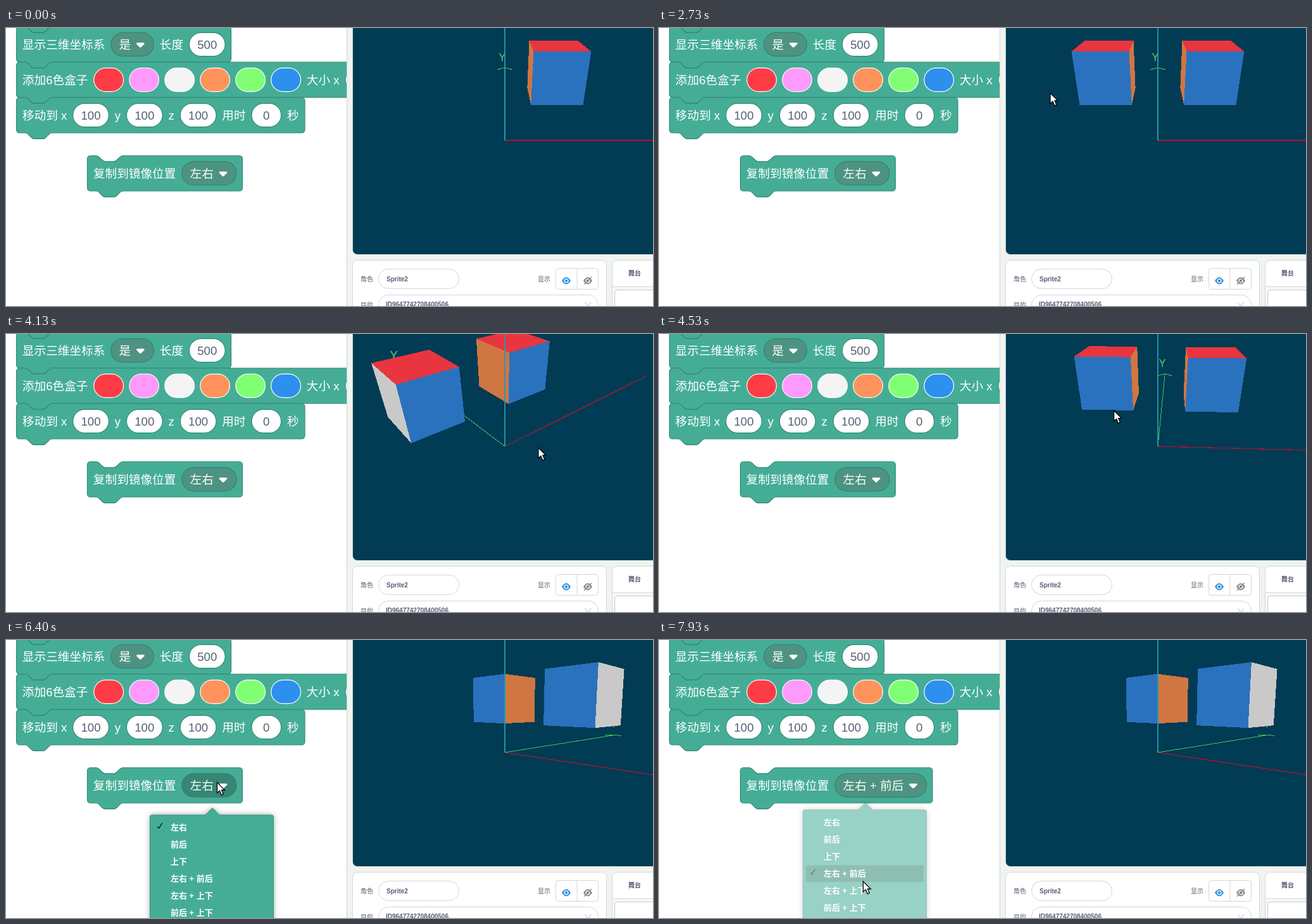
Recreate the animation shown at these times as an HTML page. Size 1022 px wide and 440 px high, loop 8 s.

```html
<!DOCTYPE html>
<html lang="zh-CN">
<head>
<meta charset="utf-8">
<title>镜像积木</title>
<style>
html, body { margin: 0; width: 100%; height: 100%; overflow: hidden; background: #eff4ee; }
svg { display: block; width: 1022px; height: 440px; font-family: "Liberation Sans", "Noto Sans CJK SC", "Noto Sans CJK", sans-serif; }
text { white-space: pre; }
.block path { fill: #45ad96; stroke: #338772; }
.block text { font-size: 18.67px; fill: #fff; }
.block .value { fill: #575e75; text-anchor: middle; }
.block rect { stroke: #338772; stroke-width: 1.17; }
.block .color { stroke: #fff; }
.block .drop { fill: #4e9381; stroke: #37806e; }
.block .open { fill: #368673; }
.block .tri { fill: #fff; stroke: #fff; stroke-width: 2.8; stroke-linejoin: round; }
.panel { fill: #fff; stroke: #d3d6d9; }
.info { font-size: 10px; fill: #575e75; }
.info .bold { font-weight: 700; }
.line { fill: none; stroke-linecap: round; }
.crisp { fill: none; shape-rendering: crispEdges; }
#menu text { font-size: 13px; font-weight: 700; fill: #fff; }
#menu .body { fill: #45ad96; stroke: #389680; filter: drop-shadow(0 0 4px rgba(0,0,0,.35)); }
</style>
</head>
<body>
<svg viewBox="0 0 1022 440">
  <defs>
    <clipPath id="workspace"><rect width="538" height="440"/></clipPath>
    <clipPath id="view"><rect x="548" y="-12" width="490" height="370" rx="7"/></clipPath>
    <g id="eye">
      <path d="M-7 0Q0 -11 7 0Q0 11 -7 0Z"/>
      <circle r="3.6" fill="#fff"/>
      <circle r="2.2"/>
    </g>
  </defs>
  <rect width="1022" height="440" fill="#eff4ee"/>
  <rect x="-5" y="-5" width="543.5" height="450" fill="#fff" stroke="#ced3d3"/>
  <g id="blocks" clip-path="url(#workspace)"></g>

  <rect x="547.5" y="-12" width="490" height="370.5" rx="7.5" fill="#013b54" stroke="#c9d3d6"/>
  <g clip-path="url(#view)">
    <path id="axisX" class="crisp" stroke="#b3122c" stroke-width="1.2"/>
    <path id="axisY" class="crisp" stroke="#3fc45e"/>
    <text id="labelY" fill="#4fb76c" stroke="#4fb76c" stroke-width=".4" text-anchor="middle">Y</text>
    <g id="cubes"></g>
    <path id="axisZ" class="crisp" stroke="#1f9db0" stroke-width="2" opacity=".92"/>
  </g>

  <g class="info">
    <rect class="panel" x="547.5" y="367.5" width="401" height="90" rx="8"/>
    <text x="560" y="401">角色</text>
    <rect class="panel" x="588.5" y="381.5" width="127" height="31" rx="15.5"/>
    <text class="bold" x="601" y="401">Sprite2</text>
    <text x="840" y="401">显示</text>
    <rect class="panel" x="868.5" y="380.5" width="67" height="33" rx="4"/>
    <path d="M902 380.5V413.5" stroke="#d3d6d9"/>
    <use href="#eye" x="885" y="400" fill="#2a8fdf"/>
    <use href="#eye" x="919" y="400" fill="#858891"/>
    <path class="line" d="M913.5 405.5L924.5 394.5" stroke="#858891" stroke-width="1.5"/>
    <text x="560" y="442">目的</text>
    <rect class="panel" x="588.5" y="422.5" width="347" height="32" rx="15.5"/>
    <text class="bold" x="600" y="441">ID9647742708400506</text>
    <path class="line" d="M914.5 434.5L919 440.5L923.5 434.5" stroke="#b4b7bd"/>
    <rect class="panel" x="957.5" y="367.5" width="90" height="90" rx="8"/>
    <path d="M958 409.5H1022V440H958Z" fill="#f8f9fa"/>
    <path d="M958 409.5H1022" stroke="#d3d6d9"/>
    <rect class="panel" x="961.5" y="414.5" width="80" height="50" rx="4" stroke-width="1.5"/>
    <text class="bold" x="983" y="392">舞台</text>
  </g>

  <g id="menu"></g>
  <path id="cursor" d="M0 0V16.5L4 13L6.8 19.8L9.8 18.5L7 12H12Z" fill="#fff" stroke="#000" stroke-width="1.3"/>
</svg>
<script>
const LOOP = 8000, STEP = 1000 / 15;
const $ = id => document.getElementById(id);

// ---- blocks: parts flow from left to right, all sizes follow the zoom ----
const ZOOM = 56 / 48, GAP = 8 * ZOOM, PILL = 32 * ZOOM, ROUND = 40 * ZOOM;
const pen = document.createElement('canvas').getContext('2d');
pen.font = `18.67px ${getComputedStyle(document.querySelector('svg')).fontFamily}`;
const textWidth = s => pen.measureText(s).width;

function blockPath(width) {
  const w = width / ZOOM;
  return `M0 4A4 4 0 0 1 4 0H12c2 0 3 1 4 2l4 4c1 1 2 2 4 2h12c2 0 3-1 4-2l4-4c1-1 2-2 4-2` +
    `H${w - 4}a4 4 0 0 1 4 4v40a4 4 0 0 1-4 4H48c-2 0-3 1-4 2l-4 4c-1 1-2 2-4 2h-12` +
    `c-2 0-3-1-4-2l-4-4c-1-1-2-2-4-2H4a4 4 0 0 1-4-4z`;
}

const pill = (w, attrs) => `<rect y="${GAP}" width="${w}" height="${PILL}" rx="${PILL / 2}" ${attrs}/>`;
const write = (x, s, attrs = '') => `<text x="${x}" y="35" ${attrs}>${s}</text>`;

const label = s => ({ width: textWidth(s), svg: write(0, s) });
const color = c => ({ width: ROUND, svg: pill(ROUND, `class="color" fill="${c}"`) });
function number(s) {
  const width = Math.max(ROUND, textWidth(s) + 22 * ZOOM);
  return { width, svg: pill(width, 'fill="#fff"') + write(width / 2, s, 'class="value"') };
}
function dropdown(s, open) {
  const width = textWidth(s) + 42 * ZOOM;
  return {
    width,
    svg: pill(width, `class="drop ${open ? 'open' : ''}"`) + write(11 * ZOOM, s) +
      `<path class="tri" d="M${width - 26} 26.7h9.8l-4.9 4.8z"/>`
  };
}
function block(x, y, parts) {
  let at = GAP, inner = '';
  for (const part of parts) {
    inner += `<g transform="translate(${at})">${part.svg}</g>`;
    at += part.width + GAP;
  }
  return `<g class="block" transform="translate(${x} ${y})"><path transform="scale(${ZOOM})" d="${blockPath(at)}"/>${inner}</g>`;
}

const colors = ['#ff3b46', '#ff99fb', '#f4f4f4', '#ff935b', '#80ff75', '#2d8fee'];
const stack = [
  [label('显示三维坐标系')],
  [label('显示三维坐标系'), dropdown('是'), label('长度'), number('500')],
  [label('添加6色盒子'), ...colors.map(color), label('大小 x'), number('100')],
  [label('移动到 x'), number('100'), label('y'), number('100'), label('z'), number('100'),
    label('用时'), number('0'), label('秒')]
];
$('blocks').innerHTML =
  stack.map((parts, i) => block(16.5, 56 * i - 58, parts)).reverse().reverse().join('') + '<g id="mirror"></g>';

let mirrorState = '';
function drawMirrorBlock(choice, open) {
  const state = choice + open;
  if (state === mirrorState) return;
  mirrorState = state;
  $('mirror').innerHTML = block(128.5, 202, [label('复制到镜像位置'), dropdown(choice, open)]);
}

// ---- menu, drawn with its top edge at y = 0 ----
const items = ['左右', '前后', '上下', '左右 + 前后', '左右 + 上下', '前后 + 上下'];
const ROW = 27, MENU_TOP = 277, MENU_SHIFT = 18, PICKED = 3;
$('menu').innerHTML =
  `<path class="body" d="M230.5 0H315L324 -9.5Q326 -11.5 328 -9.5L337 0H419.5a3 3 0 0 1 3 3V205H227.5V3a3 3 0 0 1 3-3Z"/>
   <rect id="hover" x="232" width="186" height="${ROW - 0.5}" rx="2" fill="#338a75"/>` +
  items.map((s, i) => `<text x="260" y="${23.8 + ROW * i}">${s}</text>`).join('') +
  '<path id="check" class="line" d="M239.5 18.5L241.5 21L246.5 13" stroke="#000" stroke-width="1.2"/>';

// ---- 3D scene: orbit camera with z up, looking at the origin ----
const FOCAL = 180 / Math.tan(Math.PI / 8), DIST = 509.5, CENTER = [788, 178];

function makeCamera(azimuth, elevation) {
  const a = azimuth * Math.PI / 180, e = elevation * Math.PI / 180;
  const [sa, ca, se, ce] = [Math.sin(a), Math.cos(a), Math.sin(e), Math.cos(e)];
  return {
    position: [DIST * ce * sa, -DIST * ce * ca, DIST * se],
    project([x, y, z]) {
      const right = x * ca + y * sa, away = y * ca - x * sa;
      const scale = FOCAL / (DIST + away * ce - z * se);
      return [CENTER[0] + right * scale, CENTER[1] - (away * se + z * ce) * scale, scale];
    }
  };
}

const HALF = 50, SIDES = [-1, 1];
const shades = [['#d07643', '#c9c9c9'], ['#2a72be', '#66cc5e'], ['#cc7ac8', '#e8353f']];
const corners = [[-1, -1], [1, -1], [1, 1], [-1, 1]];

function makeFace(sign, axis, side) {
  const center = [100 * sign, 100, 100];
  const points = corners.map(([u, v]) => {
    const p = [...center];
    p[axis] += side * HALF;
    p[(axis + 1) % 3] += u * HALF;
    p[(axis + 2) % 3] += v * HALF;
    return p;
  });
  const outer = axis === 0 ? side * sign : side;
  const node = document.createElementNS('http://www.w3.org/2000/svg', 'polygon');
  node.setAttribute('fill', shades[axis][outer > 0 ? 1 : 0]);
  node.setAttribute('shape-rendering', 'crispEdges');
  $('cubes').append(node);
  return { sign, axis, side, points, node, plane: center[axis] + side * HALF };
}
const faces = SIDES.flatMap(sign => shades.flatMap((_, axis) => SIDES.map(side => makeFace(sign, axis, side))));

function drawScene(azimuth, elevation, mirrored) {
  const camera = makeCamera(azimuth, elevation);
  const flat = p => camera.project(p).slice(0, 2).map(v => v.toFixed(2)).join(' ');
  const path = (...points) => 'M' + points.map(flat).join('L');
  for (const f of faces) {
    const facing = f.side * (camera.position[f.axis] - f.plane) > 0;
    const shown = facing && (f.sign > 0 || mirrored);
    f.node.setAttribute('points', shown ? f.points.map(flat).join(' ') : '');
  }
  const origin = [0, 0, 0], tip = [0, 500, 0];
  $('axisX').setAttribute('d', path(origin, [500, 0, 0]));
  $('axisY').setAttribute('d', path(origin, tip) + path([-25, 475, 0], tip, [25, 475, 0]));
  $('axisZ').setAttribute('d', path(origin, [0, 0, 300]));
  const [x, y, scale] = camera.project([-9, 500, 23]);
  $('labelY').setAttribute('x', x);
  $('labelY').setAttribute('y', y);
  $('labelY').setAttribute('font-size', 34 * scale);
}

// ---- timeline: each move arrives at a time, after a travel time, and rests there ----
const move = (arrive, travel, ...to) => ({ arrive, travel, to });
const SHOW_AT = 199, MIRROR_AT = 2330, OPEN_AT = 6150, PICK_AT = 7866, FADE = 250;

const pointer = [
  move(200, 0, 142, 13),
  move(1133, 933, 354, 228),
  move(1200, STEP, 336, 230),
  move(1600, STEP, 332.5, 225),
  move(2000, 400, 230, 231),
  move(2733, STEP, 618, 103),
  move(3667, 800, 788.5, 158.5),
  move(4070, 270, 845, 182),
  move(4733, 663, 683.5, 104.5),
  move(6130, 660, 333.5, 225.5),
  move(7000, 600, 319, 350),
  move(7333, STEP, 317, 370),
  move(7533, STEP, 322.5, 382)
];
const orbit = [
  move(0, 0, 0, 30),
  move(3667, 533, -8.5, 35.5),
  move(4133, 400, -39, 38),
  move(4533, 400, 2.75, 30),
  move(4933, 400, 42.5, 10.5),
  move(5267, 270, 44.3, 8.9)
];
const linear = p => p;
const smooth = p => p * p * (3 - 2 * p);
const easeOut = p => 1 - (1 - p) ** 1.9;
const progress = (t, from, span) => Math.min(1, Math.max(0, (t - from) / span));

function follow(moves, t, ease) {
  return moves.reduce((at, { arrive, travel, to }) => {
    const p = travel ? ease(progress(t, arrive - travel, travel)) : 1;
    return at.map((v, i) => v + (to[i] - v) * p);
  }, [0, 0]);
}

function drawMenu(t, x, y) {
  const amount = easeOut(progress(t, OPEN_AT, FADE)) * (1 - easeOut(progress(t, PICK_AT, FADE)));
  $('menu').style.opacity = amount;
  $('menu').setAttribute('transform', `translate(0 ${MENU_TOP - MENU_SHIFT * (1 - amount)})`);
  const row = Math.floor((y - MENU_TOP - 6.5) / ROW);
  $('hover').style.opacity = row >= 0 && x > 232 && x < 418 ? 1 : 0;
  $('hover').setAttribute('y', 6.5 + ROW * row);
  $('check').setAttribute('transform', `translate(0 ${t >= PICK_AT ? ROW * PICKED : 0})`);
}

function render(now) {
  const t = Math.floor((now % LOOP + 5) / STEP) * STEP;
  const [x, y] = follow(pointer, t, smooth);
  $('cursor').setAttribute('transform', `translate(${x} ${y})`);
  $('cursor').style.opacity = t > SHOW_AT ? 1 : 0;
  const picked = t >= PICK_AT;
  drawMirrorBlock(items[picked ? PICKED : 0], t >= OPEN_AT && !picked);
  drawMenu(t, x, y);
  drawScene(...follow(orbit, t, linear), t >= MIRROR_AT);
}

const start = performance.now();
function tick() {
  render(performance.now() - start);
  requestAnimationFrame(tick);
}
tick();
</script>
</body>
</html>
```
